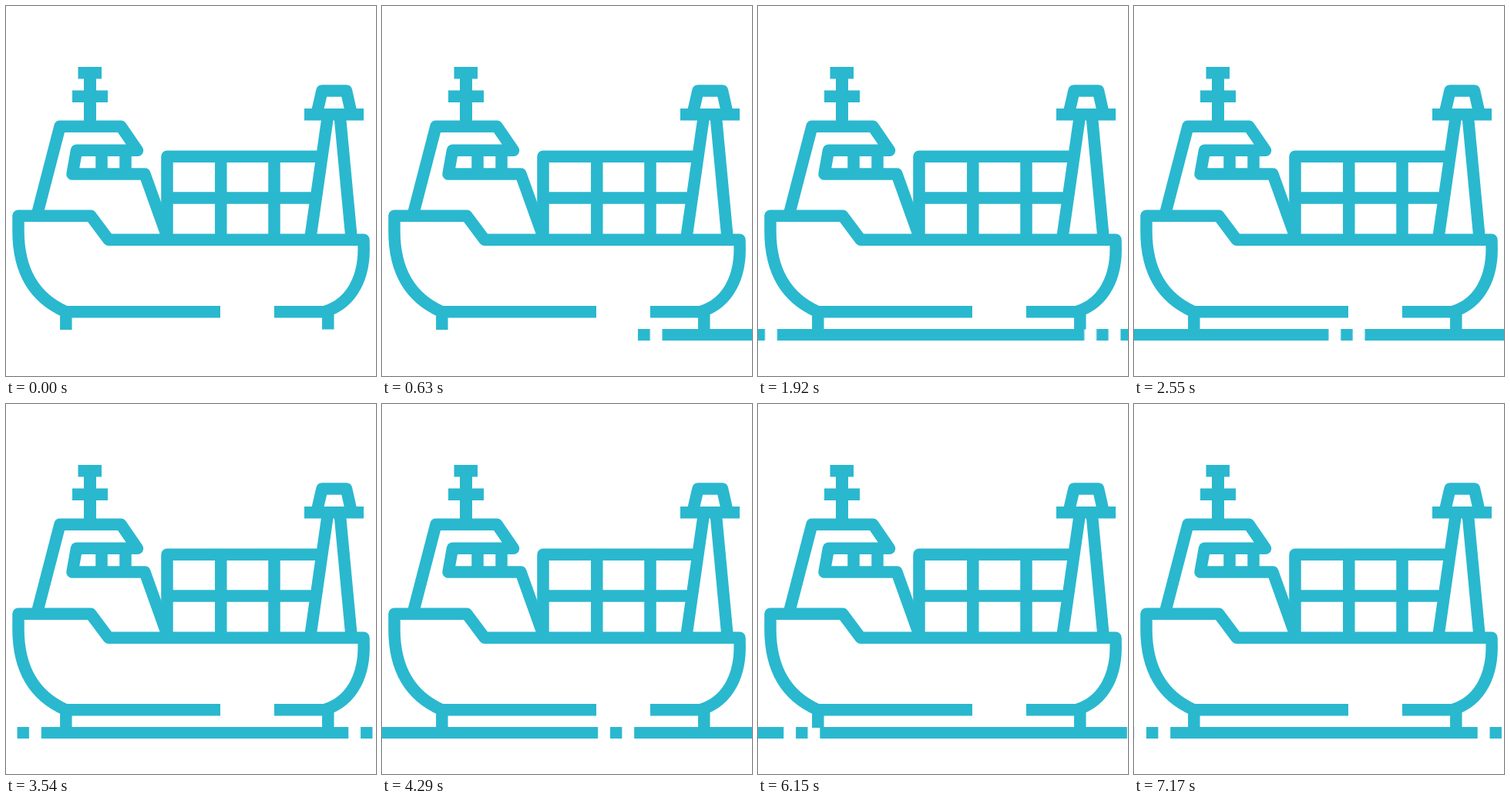
An HTML page that plays this animation: 480x480 px, repeating every 7230 ms.

```html
<!DOCTYPE html>
<html lang="en">
<head>
<meta charset="utf-8">
<title>Cargo ship</title>
<style>
  html, body { margin: 0; width: 100%; height: 100%; overflow: hidden; background: #fff; }
  svg { display: block; width: 100%; height: 100%; --ink: #2ab8cf; }
  .line { fill: none; stroke: var(--ink); stroke-width: 15.5; stroke-linejoin: round; }
  .fill { fill: var(--ink); }
  .water { animation: drift 7230ms infinite; }
  /* The water slides in from the right, eases to rest and holds briefly. */
  @keyframes drift {
    0% { transform: translateX(482.3px); animation-timing-function: cubic-bezier(.375, .45, .6, 1); }
    99.17%, 100% { transform: translateX(-875px); }
  }
</style>
</head>
<body>
<svg viewBox="0 0 480 480">
  <defs>
    <rect id="dot" y="419" width="15.4" height="15"/>
    <g id="wave">
      <use href="#dot"/>
      <rect x="31.2" y="419" width="398.5" height="15"/>
    </g>
  </defs>

  <g class="line">
    <!-- hull -->
    <path d="M77 396.5C38 379 16 345 16 292V272.3H110L133 303.2H464V308C466 350 450 385 414 396.5"/>
    <path d="M76 396.7H278M348 396.7H415"/>
    <path d="M77.8 396V420M417.8 396V419.5"/>
    <!-- cabin -->
    <path d="M41 268L70 156.2H149L170.5 187.3H91.5L86 218H180L209 299"/>
    <path d="M124 190V215M155 190V215"/>
    <!-- containers -->
    <path d="M209 303V195.2H406M209 249H400M278.8 195V303M348 195V303"/>
    <!-- crane -->
    <path d="M417 146L395 300M433.5 146L448 300"/>
    <path d="M404 136L410 110H441.5L447.3 136"/>
  </g>

  <g class="fill">
    <!-- mast -->
    <rect x="93.5" y="79" width="30.5" height="15.5"/>
    <rect x="101" y="90" width="16" height="64"/>
    <rect x="86" y="109.5" width="46" height="15.5"/>
    <!-- crane beam -->
    <rect x="387" y="133" width="77" height="15.5"/>
  </g>

  <g class="fill water">
    <use href="#wave"/>
    <use href="#wave" x="445.5"/>
    <use href="#wave" x="891"/>
    <use href="#dot" x="1336.5"/>
  </g>
</svg>
</body>
</html>
```
